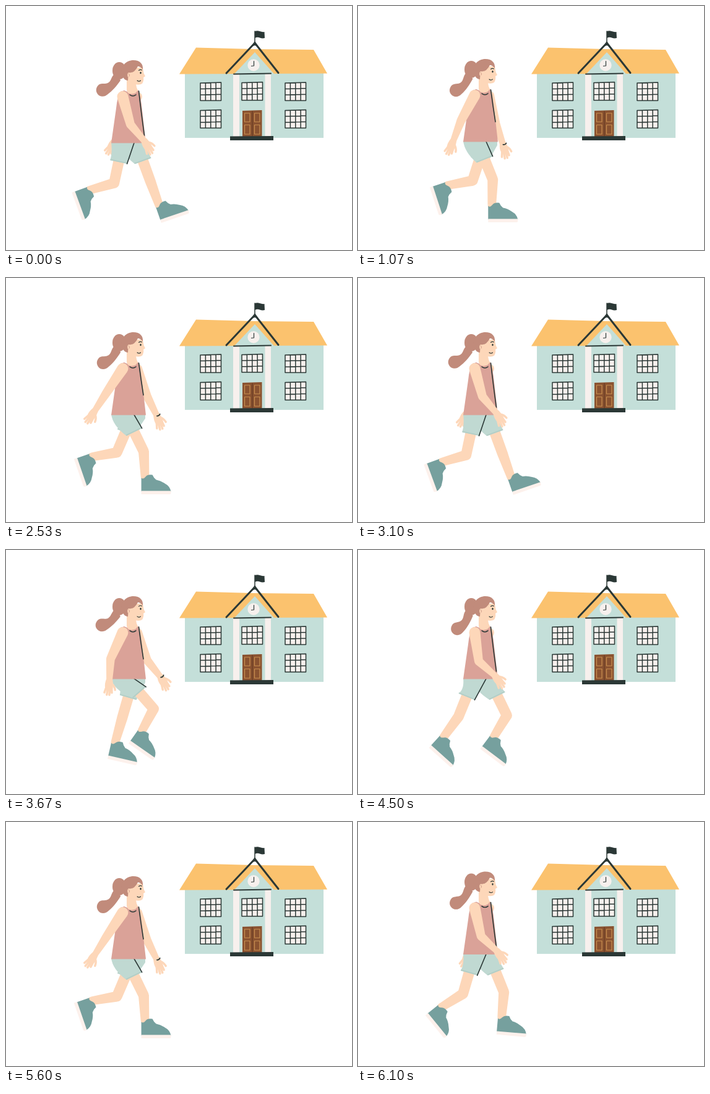
An HTML page that plays this animation: 559 by 396 pixels, repeating every 6.13 s.

```html
<!DOCTYPE html>
<html lang="en">
<head>
<meta charset="utf-8">
<title>Walking to school</title>
<style>
  html, body { margin: 0; width: 100%; height: 100%; overflow: hidden; background: #fff; }
  svg { display: block; width: 100vw; height: 100vh; }
</style>
</head>
<body>
<svg id="stage" viewBox="0 0 559 396" xmlns="http://www.w3.org/2000/svg"></svg>
<script>
const NS = 'http://www.w3.org/2000/svg';
const stage = document.getElementById('stage');
const C = {
  skin: '#fdd7b9', hair: '#c18b7b', shirt: '#daa298', shorts: '#c0d9d2', hem: '#b3cec6',
  shoe: '#76a09e', sole: '#fdf1ec', ink: '#2b3836', wall: '#c4dfd9', roof: '#fbc26e',
  cream: '#f7f0ed', door: '#8a5230', trim: '#c99050'
};

function el(tag, attrs, parent = stage) {
  const node = document.createElementNS(NS, tag);
  for (const k in attrs) node.setAttribute(k, attrs[k]);
  parent.appendChild(node);
  return node;
}
const group = (parent) => el('g', {}, parent);
const fill = (d, color, parent) => el('path', { d, fill: color }, parent);
const line = (d, w, color, parent) => el('path', {
  d, fill: 'none', stroke: color, 'stroke-width': w,
  'stroke-linecap': 'round', 'stroke-linejoin': 'round'
}, parent);

// ---- School ----
function pane(x, y) {
  const w = 33.5, h = 29.5;
  let d = `M${x} ${y + 1}L${x + w} ${y}V${y + h}H${x}Z`;
  fill(d, C.cream);
  for (let i = 1; i < 4; i++) d += `M${x + w * i / 4} ${y + 1}v${h - 1}`;
  for (let i = 1; i < 3; i++) d += `M${x} ${y + h * i / 3 + 0.7}l${w} -1`;
  line(d, 1.5, C.ink);
}

function school() {
  fill('M289 108H513V214H289Z', C.wall);
  fill('M307 67.5L400 70L497 71L519 109.5L280 110.5Z', C.roof);
  fill('M369 110L402 75L433 110Z', C.wall);
  fill('M367 110H377V212H367ZM418.5 110H428V212H418.5Z', C.cream);
  line('M368 110.5L428 109.5', 2, C.ink);
  line('M356 109L402 60L440 108.5', 3, C.ink);
  fill('M402 57L396 66L402 64L408 66Z', C.ink);
  line('M402 60V41', 1.5, C.ink);
  fill('M402 41Q406 39.5 410 41T417.5 42L418 52Q414 53 410 51.5T402 52Z', C.ink);
  el('circle', { cx: 400, cy: 96, r: 9.7, fill: C.cream });
  line('M400.5 89.5V97L396.5 97.5', 1.2, C.ink);
  for (const x of [314, 451]) for (const y of [124, 168.5]) pane(x, y);
  pane(381, 123.5);
  fill('M382 170L413.5 169V212H382Z', C.door);
  line('M398 171V211', 1, '#5f3720');
  for (const x of [385.5, 401.5]) line(`M${x} 174h8.5v14h-8.5ZM${x} 193h8.5v15h-8.5Z`, 1.2, C.trim);
  fill('M362 211.5L432 211V218H362Z', C.ink);
}
school();

// ---- Walker, layered back to front ----
function makeArm(watch) {
  const arm = { skin: fill('', C.skin), hand: group() };
  fill('M-5 -3Q-8 6 -6 12H6Q7 4 5 -3Z', C.skin, arm.hand);
  line('M-4 9L-7 19M-1.5 10L-3 22.5M1.5 10L1.2 22.5M4.3 9L5 19', 3.5, C.skin, arm.hand);
  line('M4 4Q9 8 10 14', 3.5, C.skin, arm.hand);
  if (watch) line('M0 0Q3 1.5 5.5 -1', 1.8, C.ink, arm.hand);
  return arm;
}

function makeLeg() {
  const leg = { skin: fill('', C.skin), shoe: group() };
  fill('M-6 24V2Q-3 5 1 0Q4 -4 12 -3Q14 2 18 5Q25 6 32 11Q40 15 42 24Z', C.shoe, leg.shoe);
  fill('M-6 23H42V26Q42 28.5 40 28.5H-6Z', C.sole, leg.shoe);
  leg.shorts = fill('', C.shorts);
  leg.hem = line('', 2, C.hem);
  return leg;
}

const farArm = makeArm(true);
const farLeg = makeLeg();
const nearLeg = makeLeg();
const seam = line('', 1.6, C.ink);
const torso = group();
const nearArm = makeArm(false);

fill('M195 110L210 124Q210 133 214 138L211 144H197L195 136Z', C.skin, torso);
fill('M191 137Q203 144 214 137Q218 148 219 160L226 222.5H170L178 166Q180 146 185 139Z', C.shirt, torso);
fill('M195 136Q203 141 212 136L211 140Q204 145 197 141Z', C.skin, torso);
line('M200 144Q205 148 210 144', 1.5, C.ink, torso);
const strap = line('', 1.6, C.ink, torso);
const tail = fill('M-4 8C6 10 9 2 16 2C22 2 25 8 31 8C37 7 41 3 41 -3C41 -10 34 -14 28 -13C19 -13 8 -10 -2 -6Z', C.hair, torso);
fill('M194 100H221Q222 106 222.5 109L225 114L222 116Q223 121 220 126Q216 129 208 127L195 122Z', C.skin, torso);
el('ellipse', { cx: 183, cy: 105, rx: 11, ry: 14, fill: C.hair }, torso);
fill('M188 113C183 98 194 88 206 88C216 88 222 94 221 103Q217 98 213 98Q208 108 201 108Q197 112 197 121Q190 120 188 113Z', C.hair, torso);
el('ellipse', { cx: 199, cy: 112, rx: 2.8, ry: 4, fill: C.skin }, torso);
line('M198 110Q200.5 111 199 114', 0.8, C.hair, torso);
line('M214.5 104.5Q217 102.5 219.5 104', 1.1, C.ink, torso);
el('ellipse', { cx: 217.5, cy: 108.5, rx: 1.2, ry: 1.8, fill: C.ink }, torso);
line('M212 121Q215 123.5 217.5 121', 1.1, C.ink, torso);

// ---- Motion over a cycle of 22 steps ----
const CYCLE = 22;

// Mean plus harmonics, each given as a cosine and a sine amplitude
const wave = (a, mean, ...amps) => amps.reduce((sum, amp, i) => {
  const h = (i >> 1) + 1;
  return sum + amp * (i % 2 ? Math.sin(h * a) : Math.cos(h * a));
}, mean);

// Key poses: step, then the angles of thigh, shin and shoe
const NEAR_GAIT = [[0, -12, -74, 70], [3, -11, -78, 74], [8, 41, -28, 35], [10, 22, 20, -16],
  [14, 26, 3, 0], [15, 22, -2, 0], [20, -22, -36, 42], [21, -16, -58, 51]];
const FAR_GAIT = [[0, 20, 20, -19], [2, 20, 14, 0], [8, -16, -16, 13], [10, -24, -42, 46],
  [14, -23, -80, 71], [15, -18, -79, 72], [20, 26, -31, 37], [21, 22, -5, 5]];

// Smooth periodic curve through the key poses
function gait(keys, p) {
  const n = keys.length;
  const key = (i) => {
    const turn = Math.floor(i / n), [step, ...angles] = keys[i - turn * n];
    return { step: step + turn * CYCLE, angles };
  };
  let i = n - 1;
  while (keys[i][0] > p) i--;
  const [a, b, c, d] = [-1, 0, 1, 2].map((k) => key(i + k));
  const w = c.step - b.step, u = (p - b.step) / w;
  return b.angles.map((v, j) => {
    const m0 = (c.angles[j] - a.angles[j]) / (c.step - a.step) * w;
    const m1 = (d.angles[j] - v) / (d.step - b.step) * w;
    const e = c.angles[j] - v;
    return v + u * (m0 + u * (3 * e - 2 * m0 - m1 + u * (m0 + m1 - 2 * e)));
  });
}

const f = (v) => v.toFixed(2);
const pt = ([x, y]) => `${f(x)} ${f(y)}`;
const rad = (deg) => deg * Math.PI / 180;
// Point at a distance; the angle swings forward from straight down
const swing = ([x, y], len, deg) => [x + len * Math.sin(rad(deg)), y + len * Math.cos(rad(deg))];
const place = (node, at, deg) => node.setAttribute('transform', `translate(${pt(at)}) rotate(${f(deg)})`);

// Tapered limb through points with a radius each
function limb(points, radii) {
  let d = '';
  points.forEach(([x, y], i) => {
    const r = radii[i];
    d += `M${pt([x - r, y])}a${r} ${r} 0 1 0 ${2 * r} 0a${r} ${r} 0 1 0 ${-2 * r} 0Z`;
    if (!i) return;
    const [x0, y0] = points[i - 1], r0 = radii[i - 1];
    const len = Math.hypot(x - x0, y - y0);
    const nx = (y0 - y) / len, ny = (x - x0) / len;
    d += `M${pt([x0 + nx * r0, y0 + ny * r0])}L${pt([x + nx * r, y + ny * r])}` +
      `L${pt([x - nx * r, y - ny * r])}L${pt([x0 - nx * r0, y0 - ny * r0])}Z`;
  });
  return d;
}

function poseLeg(leg, keys, p, hip, waist, near) {
  const [thigh, shin, turn] = gait(keys, p);
  const knee = swing(hip, 74, thigh), ankle = swing(knee, 41, shin);
  leg.skin.setAttribute('d', limb([hip, knee, ankle], [9, 8.5, 6.8]));
  place(leg.shoe, ankle, turn);

  const hem = (across, down) => swing(swing(hip, down, thigh), across, thigh + 90);
  const front = hem(14, 39), back = hem(-14, 39), top = f(waist - 1);
  const left = near ? 170 : 184, right = near ? 207 : 225;
  leg.shorts.setAttribute('d', `M${left} ${top}H${right}${near ? '' : `v7`}` +
    `L${pt(front)}L${pt(back)}Q${left + 2} ${f(waist + 17)} ${left} ${top}Z`);
  leg.hem.setAttribute('d', `M${pt(hem(13, 38))}L${pt(hem(-13, 38))}`);
  if (near) seam.setAttribute('d', `M207 ${f(waist)}L${pt(front)}`);
}

function poseArm(arm, shoulder, r, upper, fore) {
  const elbow = swing(shoulder, 47, upper), wrist = swing(elbow, 36, fore);
  arm.skin.setAttribute('d', limb([shoulder, elbow, wrist], [r, 7, 4.8]));
  place(arm.hand, wrist, fore > 0 ? -0.75 * fore : -fore);
}

function pose(p) {
  const a = p / CYCLE * 2 * Math.PI;
  const body = wave(2 * a, 133, 1.6, 7.2, 2.4, 2.1);
  const droop = wave(a, 34, 0, -12, 0, -6);
  const reach = wave(a, 0, -28);
  poseArm(farArm, [213, body + 10], 7, reach, wave(a, 9, -36, 0, 0, -6));
  poseArm(nearArm, [188.5, body + 10], 9, wave(a, -11.5, 27, 6), wave(a, 5, 35, 0, 0, -15));
  poseLeg(farLeg, FAR_GAIT, p, [208, body + 78], body + 85, false);
  poseLeg(nearLeg, NEAR_GAIT, p, [190, body + 78], body + 85, true);
  torso.setAttribute('transform', `translate(0 ${f(body - 137)})`);
  place(tail, [180, 117], 180 - droop);
  strap.setAttribute('d', reach > 0 ? 'M214.5 138Q218 165 222 190' : 'M214.5 138Q218 170 223.5 210');
}

// Ten steps every 700 ms, the first of them held longer
const LOOP = 6130;
function stepAt(t) {
  const beat = Math.floor(t / 700), rest = t - beat * 700;
  let k = 0;
  while (k < 9 && rest >= 100 + 10 * Math.round(k * 20 / 3)) k++;
  return beat * 10 + k;
}

const start = performance.now();
let shown = -1;
function tick() {
  const step = stepAt((performance.now() - start) % LOOP) % CYCLE;
  if (step !== shown) pose(shown = step);
  requestAnimationFrame(tick);
}
tick();
</script>
</body>
</html>
```
